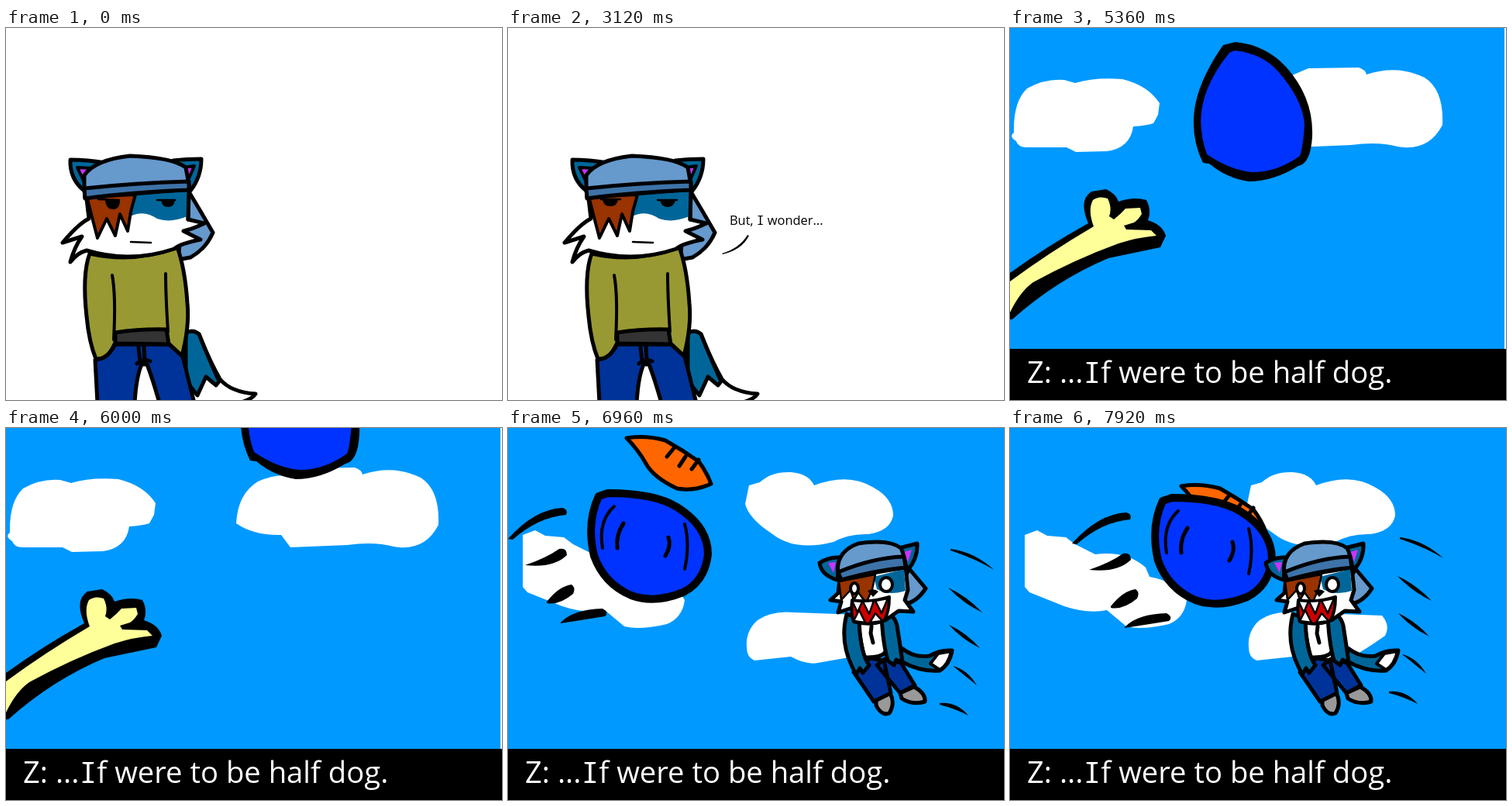
These frames come from a looping animation (640 px wide and 480 px high, 8000 ms). An HTML page:

```html
<!DOCTYPE html>
<html lang="en">
<head>
<meta charset="utf-8">
<style>
html, body { margin: 0; width: 100%; height: 100%; overflow: hidden; background: #fff; }
svg { display: block; width: 640px; height: 480px; }
text { font: 16.4px "Open Sans", sans-serif; }
tspan { font-family: "Noto Sans Mono", monospace; }
.ink { stroke: #000; stroke-width: 5; stroke-linejoin: round; stroke-linecap: round; }
.thin { stroke-width: 4; }
.fine { stroke-width: 2.5; }
.thick { stroke-width: 10; }
.line { fill: none; }
.fur { fill: #069; } .hat { fill: #69c; } .band { fill: #3d73a8; } .hair { fill: #930; }
.denim { fill: #039; } .white { fill: #fff; } .ball { fill: #03f; } .skin { fill: #ff9; }
.olive { fill: #993; } .pink { fill: #c3f; } .orange { fill: #f60; } .grey { fill: #999; }
.sky { fill: #09f; }
</style>
</head>
<body>
<svg viewBox="0 0 640 480">
<g id="talk">
  <g class="ink">
    <path class="white" d="M232 484V394Q240 388 249 395Q262 428 276 453Q290 470 322 472Q318 479 300 484Z"/>
    <path class="fur" d="M232 394Q240 388 249 395Q262 428 275 456L271 461 258 450 247 474 232 455Z"/>
    <path class="hat" d="M237 213Q252 238 267 264Q258 285 238 296L222 299 225 270Z"/>
    <path class="denim" d="M115 428Q131 428 141 408H210L228 424 243 484H198Q190 455 182 434H175Q168 450 166 484H118Z"/>
    <path class="line" d="M178 410L179 430M171 412L173 430M169 433Q178 426 186 430"/>
    <path class="olive" d="M108 291Q98 318 104 372Q107 405 116 427Q131 428 140 408H211L227 423Q237 385 234 355Q231 310 221 283Q165 304 108 291Z"/>
    <path class="line thin" d="M137 319Q142 345 139 402M206 317Q206 345 209 392"/>
    <path fill="#333" d="M141 393Q175 388 207 389L210 408 141 407Z"/>
    <path class="fur" d="M101 210Q82 195 83 170Q105 170 128 174ZM216 171Q232 169 252 169Q252 192 238 210Z"/>
    <path class="pink thin" d="M92 180L112 181 100 197ZM222 181L243 178 236 194Z"/>
    <path class="white" d="M103 212L107 246Q94 252 73 277L98 269Q88 283 83 302Q92 290 104 287Q160 304 217 285Q225 278 251 273L229 262Q242 259 256 252L235 247 236 210Z"/>
  </g>
  <path class="fur" d="M163 214L234 208V243Q212 252 195 246Q178 234 160 243Z"/>
  <path class="ink line" d="M236 208L235 247"/>
  <path class="hair ink thin" d="M104 217L118 271 130 246 141 268 147 240 157 262 161 237 167 215Z"/>
  <g class="ink">
    <path class="hat" d="M101 208V190Q115 170 160 165Q215 167 232 180L237 208 102 219Z"/>
    <path class="band" d="M101 207Q165 200 236 198V209Q160 212 102 220Z"/>
  </g>
  <g id="right">
    <path class="ink fine" d="M119 221L146 222M195 222H218"/>
    <path d="M128 222H147Q147 234 138 234T128 222ZM200 222H218Q217 231 209 231T200 222Z"/>
  </g>
  <g id="left">
    <path class="ink fine" d="M120 221L145 221M193 222H218"/>
    <path d="M122 221H142Q141 230 132 230T122 221ZM196 222H216Q214 231 206 231T196 222Z"/>
  </g>
  <path id="shut" class="ink line fine" d="M121 227Q132 231 145 227M195 227Q206 231 217 227"/>
  <path id="closed" class="ink fine" d="M161 276L187 277"/>
  <path id="open" d="M160 277Q174 274 189 277Q186 288 174 288T160 277Z"/>
  <g id="speech">
    <path d="M276 291Q299 284 309 267L311 268Q302 286 277 292Z"/>
    <g text-anchor="middle">
      <g id="say0"><text x="363" y="236">Well, <tspan>I</tspan> was born as a</text><text x="363" y="259">half human fox.</text></g>
      <text id="say1" x="360" y="254"><tspan>I</tspan> like being half human.</text>
    </g>
    <text id="say2" x="286" y="254">But, <tspan>I</tspan> wonder...</text>
  </g>
</g>

<g id="throw">
  <path class="sky" d="M0 0H638V414H0Z"/>
  <path class="white" d="M5 135Q4 95 22 78Q45 65 70 67L84 71Q110 63 145 66Q178 74 193 97L191 112 185 123Q175 126 159 127Q155 155 125 159L85 160 73 154H20Q10 153 8 146Q-2 140 5 135ZM297 123Q299 85 325 69Q345 60 364 61L385 52 450 51Q459 54 460 60Q500 47 535 64Q560 80 558 125Q540 160 500 153Q475 146 440 151L367 154 355 138Q320 139 297 123Z"/>
  <g id="toss">
    <path d="M275 22L291 18Q330 22 356 50Q392 90 390 140Q388 175 372 178Q340 198 308 198Q280 194 257 175L249 174Q236 148 237 118Q238 75 275 22Z"/>
    <path class="ball" d="M283 32L290 29Q325 33 345 55Q378 92 380 125Q378 155 374 165Q345 186 313 186Q285 184 254 163Q244 135 247 108Q252 70 283 32Z"/>
  </g>
  <g id="armLow">
    <path d="M0 290Q60 272 124 263Q121 236 140 228L161 229Q173 237 173 254L187 253Q204 254 209 264Q211 275 205 288Q215 295 215 310L206 326 138 316Q70 317 0 341Z"/>
    <path class="skin" d="M0 299Q70 282 135 269Q133 240 148 236Q163 238 163 252Q160 264 157 268Q160 274 177 264L196 267 198 276Q192 284 187 285Q170 281 167 285Q170 291 195 298L204 305 203 312Q185 310 160 305Q90 299 30 316Q15 320 0 328Z"/>
  </g>
  <g id="armHigh">
    <path d="M0 316Q50 280 101 252Q88 222 105 211L124 208Q137 214 140 224Q160 217 176 222Q183 235 178 248Q197 254 201 268L194 283 127 297Q60 325 3 376H0Z"/>
    <path class="skin" d="M0 327Q50 290 108 256Q100 235 107 222Q115 216 126 220Q132 232 128 243L134 247Q143 240 149 233L168 232 170 240Q165 248 160 251L147 255 150 260 182 261 189 268Q165 270 140 278Q85 298 30 328Q13 340 0 367Z"/>
  </g>
</g>

<g id="leap">
  <path class="sky" d="M0 0H640V415H0Z"/>
  <path class="white" d="M311 74L325 70Q340 56 365 57Q388 59 395 74Q440 57 472 77Q497 91 497 113Q493 133 465 137Q440 136 420 147Q370 160 340 136Q311 117 306 98ZM308 283Q306 262 322 248Q340 235 370 238L480 242Q491 255 484 268Q460 285 440 296L400 303Q385 306 365 295L318 300Q308 296 308 283ZM19 138L35 132 48 139 72 141 84 150 110 163Q150 158 175 180L180 192Q215 198 228 222Q225 245 205 253Q170 261 150 256L125 235Q100 240 70 230L25 212 19 205Z"/>
  <g id="shell" class="ink">
    <path class="orange" d="M153 13Q178 9 203 16Q226 29 246 43Q257 58 262 72Q240 82 218 78Q188 64 178 46Q168 28 153 13Z"/>
    <path class="line" d="M214 26L205 37M229 37L221 49M246 41L237 53"/>
  </g>
  <g id="disc">
    <path class="ball ink thick" d="M163 88L175 84Q235 84 264 102Q304 127 304 163Q300 198 272 212Q235 227 205 216Q170 201 157 165Q147 122 163 88Z"/>
    <path class="ink line thin" d="M183 101Q162 120 168 155M274 124Q281 150 274 182"/>
    <path class="ink line" d="M195 123Q185 138 187 155M253 141Q257 152 249 165"/>
    <path d="M46 143Q80 105 116 103Q124 105 121 112Q85 115 52 144ZM68 177Q95 168 112 156Q122 154 122 164Q105 181 68 177ZM96 224Q112 204 128 202Q134 206 130 214Q112 229 96 226ZM114 251Q130 234 168 233Q177 238 171 243Q140 248 114 252Z"/>
  </g>
  <path id="speed" d="M529 156Q560 160 585 183Q562 169 529 158ZM526 206Q550 217 570 238Q546 227 526 206ZM527 254Q549 264 567 284Q544 273 527 254ZM532 307Q551 312 563 332Q548 320 532 307ZM515 355Q537 353 552 371Q535 362 515 357Z"/>
  <g id="dog">
    <g class="ink">
      <path class="fur" d="M466 284Q482 297 502 294Q515 286 531 287Q528 305 515 313Q490 315 465 301Z"/>
      <path class="white thin" d="M503 304L513 291 530 288Q526 306 515 312Z"/>
      <path class="hat" d="M476 182L497 207Q485 225 470 227L465 200Z"/>
      <path class="grey" d="M433 350L451 342Q458 355 450 368Q440 372 433 358ZM464 342L482 334Q497 342 496 353Q480 358 466 349Z"/>
      <path class="denim" d="M434 306L444 298 465 303 483 332 464 342ZM404 315L425 297 443 300 452 342 430 353Z"/>
      <path class="white" d="M409 240H440L446 288Q440 297 418 296Q411 270 409 240Z"/>
      <path class="line" d="M427 256L426 265 429 277"/>
      <path class="fur" d="M395 240Q386 275 402 308L407 318 412 310 416 316 424 306Q412 290 411 245ZM440 240Q455 236 460 255Q464 280 467 303L459 299 456 306 448 300Q441 275 440 240Z"/>
      <path class="fur" d="M383 196Q362 190 360 174Q372 166 386 167ZM462 155L486 149Q487 168 474 183Z"/>
    </g>
    <path class="pink" d="M371 174L381 173 378 187ZM469 160L479 157 474 173Z"/>
    <path class="white ink" d="M386 194L384 213 374 222 388 224 384 238 402 232 405 248H445L462 236 481 237 470 222 474 209 471 180Z"/>
    <path class="fur" d="M430 192L469 182 471 210Q450 217 434 208Z"/>
    <path class="hair ink fine" d="M385 198L432 189 428 208 420 226 410 212 404 222 400 209 388 222Z"/>
    <g class="ink white">
      <ellipse class="thin" cx="446" cy="202" rx="8" ry="9"/>
      <ellipse class="thin" cx="405" cy="207" rx="5" ry="7"/>
    </g>
    <path d="M422 210Q430 206 436 211L429 218Z"/>
    <path class="ink thin" fill="#c00" d="M402 222Q400 240 404 250Q425 256 443 249Q450 238 450 218Q425 226 402 222Z"/>
    <path class="ink white fine" d="M402 223L409 238 415 224ZM416 224L424 240 430 223ZM432 223L440 239 448 220ZM404 249L411 235 419 251ZM425 251L432 239 441 249Z"/>
    <g class="ink">
      <path class="hat" d="M384 188Q380 160 410 149Q450 143 465 155Q470 165 471 180Q425 183 388 196Z"/>
      <path class="band" d="M384 186Q430 167 469 166L471 180Q430 184 388 196Z"/>
    </g>
  </g>
</g>

<g id="caption">
  <path d="M0 414H640V480H0Z"/>
  <text class="white" x="22" y="458" style="font-size:38.2px">Z: ...<tspan>I</tspan>f were to be half dog.</text>
</g>
</svg>
<script>
const LOOP = 8000;
const el = id => document.getElementById(id);
const show = (id, on) => el(id).style.display = on ? '' : 'none';
const move = (id, [x, y]) => el(id).setAttribute('transform', `translate(${x} ${y})`);
// Value of the last [time, value] step that has begun.
const step = (t, ...steps) => steps.filter(s => s[0] <= t).pop()[1];
const pick = (ids, current) => ids.forEach(id => show(id, id === current));

function draw(t) {
  pick(['talk', 'throw', 'leap'], step(t, [0, 'talk'], [4560, 'throw'], [6960, 'leap']));
  show('caption', t >= 4560);

  pick(['left', 'right', 'shut'], step(t, [0, 'right'], [480, 'left'], [1600, 'right'], [2240, 'shut'], [2320, 'left']));
  const talking = t >= 320 && t < 2560 && Math.floor((t - 320) / 320) % 2 === 0;
  pick(['open', 'closed'], talking ? 'open' : 'closed');
  show('speech', t >= 320);
  pick(['say0', 'say1', 'say2'], step(t, [0, 'say0'], [1760, 'say1'], [3120, 'say2']));

  move('toss', step(t, [0, [-106, 160]], [5360, [0, 0]], [6000, [66, -132]]));
  show('toss', t < 6640);
  pick(['armLow', 'armHigh'], t >= 5360 && t < 6160 ? 'armHigh' : 'armLow');

  move('shell', step(t, [0, [0, 0]], [7600, [68, 62]]));
  move('disc', step(t, [0, [-46, 0]], [7440, [0, 0]], [7920, [34, 6]]));
  move('dog', step(t, [0, [42, 0]], [7440, [0, 0]], [7920, [-30, 0]]));
  move('speed', step(t, [0, [42, 0]], [7440, [0, 0]], [7920, [-26, -15]]));
}

const start = performance.now();
function tick() {
  draw((performance.now() - start) % LOOP);
  requestAnimationFrame(tick);
}
tick();
</script>
</body>
</html>
```
